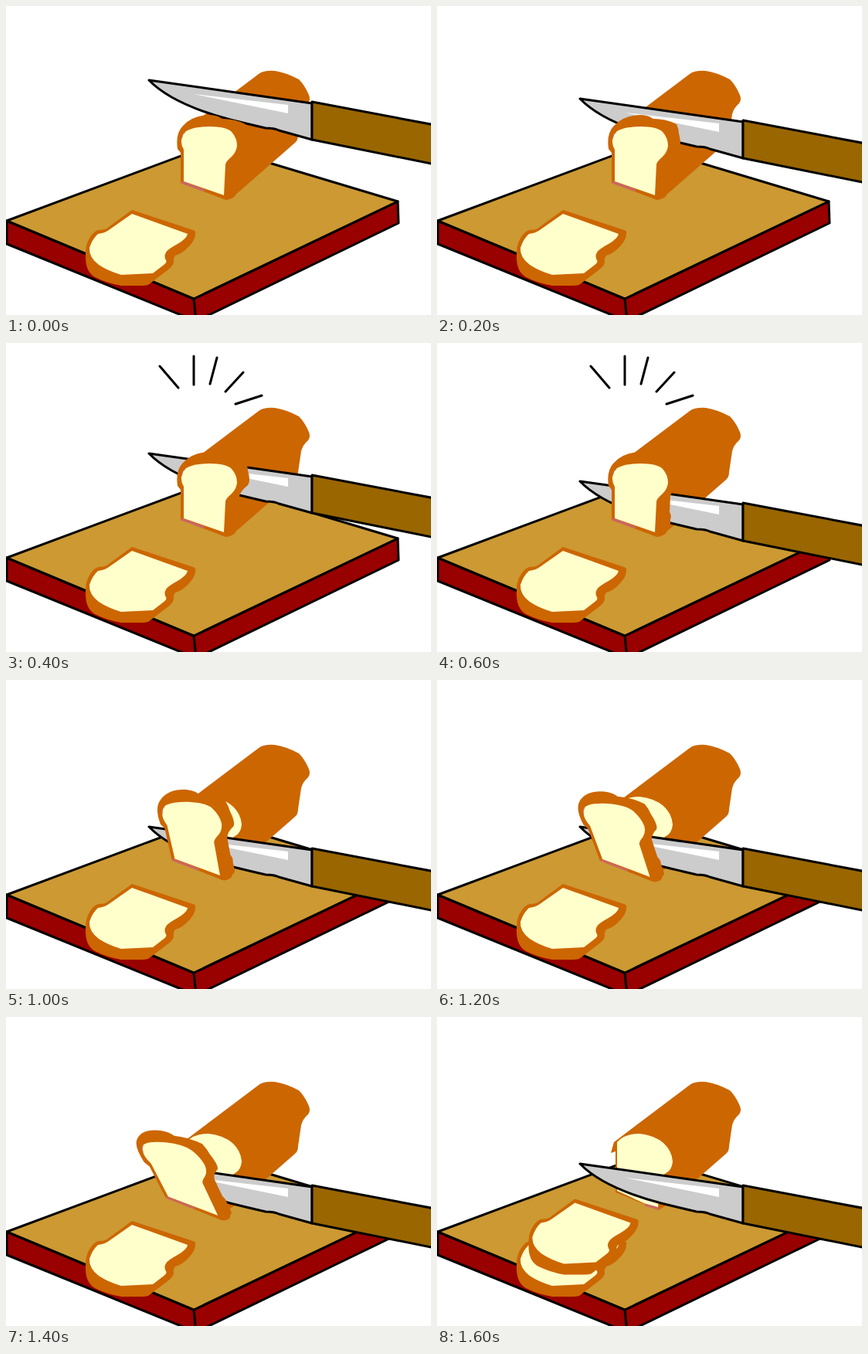
Write an HTML page that moves like this. It is 550x400 px and loops after 1800 ms.

```html
<!DOCTYPE html>
<html lang="en">
<head>
<meta charset="utf-8">
<title>Slicing bread</title>
<style>
  html, body { margin: 0; width: 100%; height: 100%; overflow: hidden; background: #fff; }
  svg { display: block; width: 100%; height: 100%; }
  .ink { stroke: #000; stroke-width: 3; stroke-linejoin: round; stroke-linecap: round; }
  .crust { fill: #c60; }
  .crumb { fill: #ffc; }
  .pink { fill: none; stroke: #c66; stroke-width: 3; }
</style>
</head>
<body>
<svg viewBox="0 0 550 400">
  <defs>
    <g id="flat">
      <path class="crust" d="M163 264L242 290Q246 291 245 295Q245 304 233 315Q228 320 219 323Q216 327 217 331Q217 336 209 342L184 361Q180 362 176 362H149Q131 359 115 351Q103 344 103 325Q102 309 109 299Q115 290 121 290Q129 290 133 286Z"/>
      <path class="crumb" d="M163 269L235 295Q234 301 222 308Q209 315 207 319Q204 324 207 329Q209 332 203 336L190 346L149 348Q132 343 120 335Q107 325 108 313Q112 301 119 295Q128 294 133 290Z"/>
    </g>
  </defs>

  <g id="board" class="ink">
    <path fill="#900" d="M1 278L1 308L246 408L508 281L507 253L243 379Z"/>
    <path fill="#c93" d="M1 278L264 180L507 253L243 379Z"/>
    <path fill="none" d="M243 379L246 408"/>
  </g>
  <use href="#flat"/>
  <use href="#flat" id="fallen" x="15.5" y="-28.5"/>

  <g id="loaf">
    <path class="crust" d="M327 88Q334 83 348 84Q362 86 379 95Q386 102 391 113Q395 121 391 126Q384 132 382 140L378 167Q378 174 374 177L302 240L287 250L231 227L231 174L225 176L229 162Z"/>
    <path class="crumb" d="M233 162Q243 151 262 151Q281 153 293 163Q304 173 305 187Q304 197 298 201Q289 206 288 212L286 247L270 242L233 225Z"/>
    <path class="pink" d="M269 243L287 248"/>
  </g>

  <g id="knife" class="ink">
    <path fill="#ccc" d="M185 96L396 126V173L353 161Q347 158 336 158Q310 152 290 147Q215 127 185 96Z"/>
    <path fill="#fff" stroke="none" d="M243 114L365 128V139Z"/>
    <path fill="#960" d="M396 124L560 155V206L396 173Z"/>
  </g>

  <g id="slice">
    <path class="crust" d="M222 185Q219 165 229 155Q242 141 265 141Q276 142 279 146Q297 146 310 153Q313 159 313 165Q317 179 313 184Q304 191 302 198L301 219Q304 223 302 228L302 237Q302 241 298 243Q296 249 286 251Q283 251 279 249L226 229L226 190Z"/>
    <path class="crumb" d="M228 170Q229 157 263 156Q285 156 292 163Q299 171 299 181Q298 189 292 195Q284 202 284 205L282 245L230 227V186Q225 177 228 170Z"/>
    <path class="pink" d="M227 228L257 239"/>
    <path class="pink" style="stroke-width:1" d="M227 172Q228 166 232 163"/>
  </g>

  <path id="burst" class="ink" fill="none" d="M199 30L223 58M243 17V54M273 19L264 53M307 38L284 63M331 68L297 79"/>
</svg>
<script>
  const STEP = 200, STEPS = 9;
  const drops = [0, 24, 47, 83, 94];
  const part = id => document.getElementById(id);
  const show = (id, on) => part(id).style.display = on ? "" : "none";
  const mix = (a, b, t) => a + (b - a) * t;

  // The slice leans away from the loaf, pivoting on its upper left corner.
  function leanTransform(lean) {
    if (!lean) return "";
    const t = (lean - 1) / 2;
    const m = [
      mix(1.04, 1.05, t), mix(0.044, 0.11, t),
      mix(0.244, 0.54, t), mix(1.06, 1.04, t),
      mix(202.5, 177, t), mix(171, 173, t)
    ];
    return `matrix(${m}) translate(-228 -170)`;
  }

  function draw() {
    const step = Math.floor(performance.now() / STEP) % STEPS;
    part("knife").setAttribute("transform", `translate(0 ${drops[Math.min(step, 4)]})`);
    part("slice").setAttribute("transform", leanTransform(Math.max(0, step - 4)));
    show("slice", step < 8);
    show("fallen", step === 8);
    show("burst", step === 2 || step === 3);
    requestAnimationFrame(draw);
  }
  draw();
</script>
</body>
</html>
```
